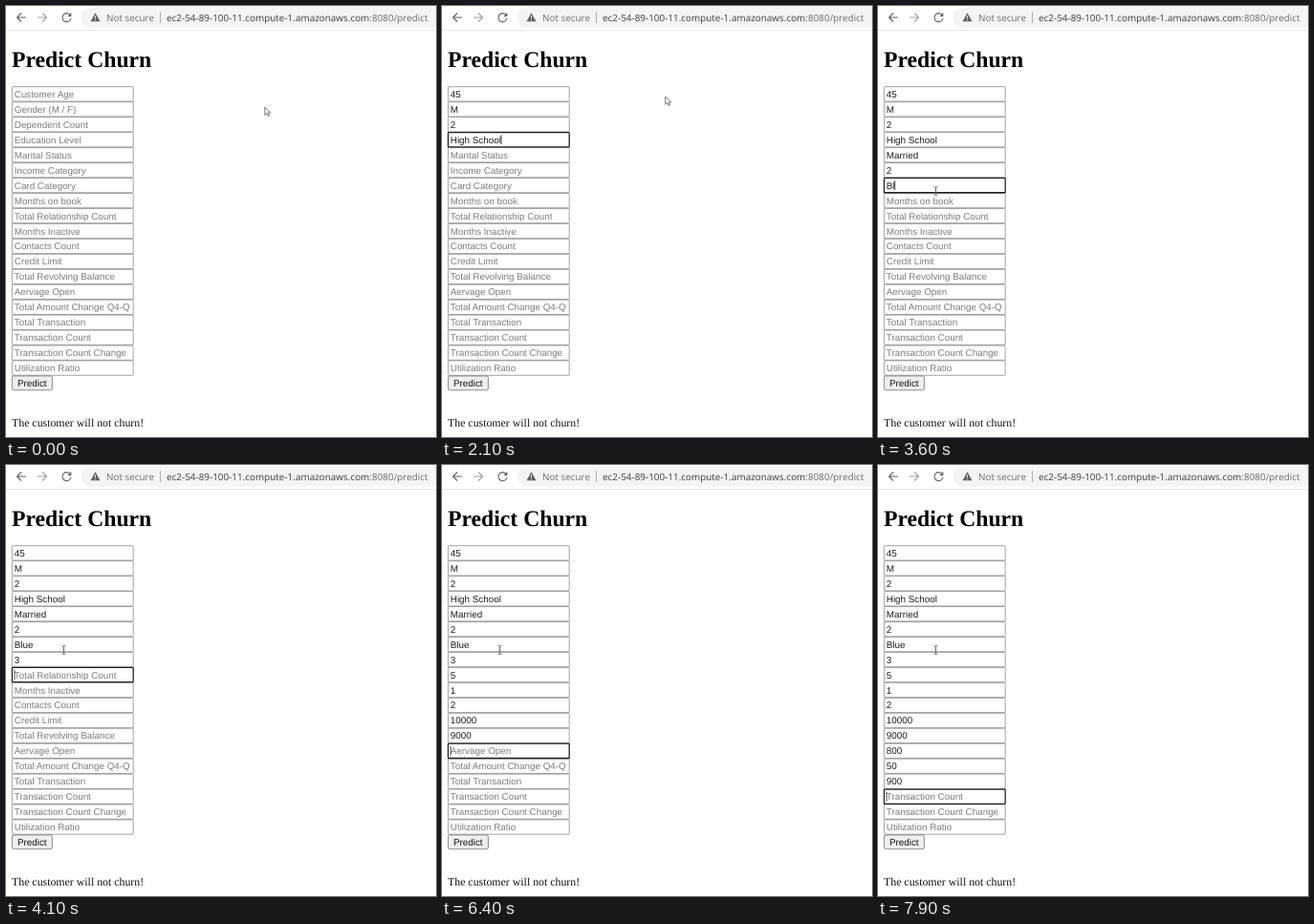
These frames come from a looping animation (450 px wide and 452 px high, 8 s). An HTML page:

```html
<!DOCTYPE html>
<html lang="en">
<head>
<meta charset="utf-8">
<title>Predict Churn</title>
<style>
html, body { margin: 0; width: 100%; height: 100%; overflow: hidden; background: #fff; }
svg { display: block; width: 100vw; height: 100vh; text-rendering: geometricPrecision; }
.bar { font: 9.92px "Open Sans", "Noto Sans", sans-serif; fill: #6b6f74; }
.form { font: 9.85px "Liberation Sans", Arial, sans-serif; }
.page { font: 11.85px "Liberation Serif", "Times New Roman", serif; fill: #111; }
.title { font-size: 23.7px; font-weight: bold; fill: #000; }
.icon { fill: none; stroke: #5f6368; stroke-width: 1.1; }
.box { fill: #fff; stroke: #8c8c8c; stroke-width: .8; }
.box.on { stroke: #222; stroke-width: 1.3; }
</style>
</head>
<body>
<svg id="stage" viewBox="0 0 450 452">
  <rect width="450" height="452" fill="#fff"/>
  <path class="icon" d="M21 12H12M16 7.5L11.5 12L16 16.5"/>
  <path class="icon" d="M33 12H42M38 7.5L42.5 12L38 16.5" opacity=".6"/>
  <path class="icon" d="M67 9.2A4.5 4.5 0 1 0 68 13"/>
  <path d="M68.3 7V11H64.3Z" fill="#5f6368"/>
  <path d="M460 1.5H89A10.5 10.5 0 0 0 89 22.5H460Z" fill="#f3f4f5"/>
  <path d="M93.5 7.3L98.5 16.3H88.5Z" fill="#5f6368"/>
  <path d="M93.5 10.3V13M93.5 14V15.1" stroke="#f3f4f5"/>
  <path d="M161.5 6V18" stroke="#a5a8ab" stroke-width=".9"/>
  <path d="M0 25.5H450" stroke="#e8e9ea"/>
  <g class="bar">
    <text x="105" y="15.5">Not secure</text>
    <text x="168" y="15.5"><tspan fill="#3c3e41">ec2-54-89-100-11.compute-1.amazonaws.com</tspan>:8080/predict</text>
  </g>
  <g class="page">
    <text class="title" x="6" y="64">Predict Churn</text>
    <text x="6" y="441">The customer will not churn!</text>
  </g>
  <g class="form">
    <g id="fields"></g>
    <rect x="6.4" y="388" width="42" height="14.8" rx="1.8" fill="#efefef" stroke="#808080" stroke-width=".9"/>
    <text x="27.3" y="399" text-anchor="middle" fill="#111">Predict</text>
  </g>
  <rect id="caret" y="0" width=".8" height="10" fill="#222"/>
  <path id="arrow" d="M0 0V8.3L2 6.5L3.4 9.5L4.7 8.9L3.4 6H6Z" fill="#fff" stroke="#555" stroke-width=".8"/>
  <path id="beam" d="M-2 -4.3H-.6L0 -3.8L.6 -4.3H2M0 -3.8V3.8M-2 4.3H-.6L0 3.8L.6 4.3H2" fill="none" stroke="#555" stroke-width=".9"/>
</svg>
<script>
const LOOP = 8000, STEP = 100, TOP = 84.7, PITCH = 15.96;
const $ = id => document.getElementById(id);
const labels = ["Customer Age", "Gender (M / F)", "Dependent Count", "Education Level",
  "Marital Status", "Income Category", "Card Category", "Months on book",
  "Total Relationship Count", "Months Inactive", "Contacts Count", "Credit Limit",
  "Total Revolving Balance", "Aervage Open", "Total Amount Change Q4-Q",
  "Total Transaction", "Transaction Count", "Transaction Count Change", "Utilization Ratio"];

// row, text, focus time, first key, last key
const entries = [
  [0, "45", 400, 600, 700], [1, "M", 900, 1100, 1100], [2, "2", 1200, 1500, 1500],
  [3, "High School", 1600, 1700, 2100], [4, "Married", 2200, 2300, 2500],
  [5, "Blue", 2600, 2700, 2800], [6, "", 2900, 2900, 2900],
  [5, "2", 3200, 3300, 3300], [6, "Blue", 3400, 3500, 3700], [7, "3", 3800, 3900, 3900],
  [8, "5", 4000, 4300, 4300], [9, "1", 4500, 4600, 4600], [10, "2", 4800, 5000, 5000],
  [11, "10000", 5300, 5400, 5700], [12, "9000", 5800, 5900, 6200],
  [13, "800", 6300, 6600, 6800], [14, "50", 6900, 7000, 7100],
  [15, "900", 7200, 7400, 7600], [16, "", 7800, 7800, 7800]
];

// time, x, y of the pointer
const path = [[0, 270.8, 106], [100, 270.8, 106], [400, 60, 94], [600, 60, 94], [900, 233.8, 95],
  [2800, 233.8, 95], [3000, 48, 185], [3100, 48, 174], [3200, 48, 174], [3400, 60.5, 194], [LOOP, 60.5, 194]];

function add(parent, tag, attrs) {
  const el = document.createElementNS("http://www.w3.org/2000/svg", tag);
  for (const k in attrs) el.setAttribute(k, attrs[k]);
  return parent.appendChild(el);
}

const fields = labels.map((label, i) => {
  const g = add($("fields"), "g", { transform: `translate(6.4 ${TOP + i * PITCH})` });
  return {
    label,
    box: add(g, "rect", { class: "box", width: 126.8, height: 15.3, rx: .6 }),
    mark: add(g, "rect", { x: 2.4, y: 2, width: 0, height: 11.5, fill: "#3390ff" }),
    text: add(g, "text", { x: 2.4, y: 11.2 })
  };
});

function typed([, text, , first, last], t) {
  if (t < first) return "";
  const part = last > first ? Math.min(1, (t - first) / (last - first)) : 1;
  return text.slice(0, 1 + Math.floor(part * (text.length - 1)));
}

function pointer(t) {
  const i = path.findIndex(p => p[0] > t), [t0, x0, y0] = path[i - 1], [t1, x1, y1] = path[i];
  const k = (t - t0) / (t1 - t0);
  return [x0 + (x1 - x0) * k, y0 + (y1 - y0) * k];
}

function draw(t) {
  const values = labels.map(() => "");
  let current = null, selected = false;
  for (const e of entries) {
    if (t < e[2]) break;
    current = e;
    selected = t < e[3] && values[e[0]] !== "";
    if (!selected) values[e[0]] = typed(e, t);
  }
  fields.forEach(({ label, box, mark, text }, i) => {
    const on = current && current[0] === i, lit = on && selected;
    text.textContent = values[i] || label;
    text.setAttribute("fill", lit ? "#fff" : values[i] ? "#1c1c1c" : "#7c7c7c");
    box.setAttribute("class", on ? "box on" : "box");
    mark.setAttribute("width", lit ? text.getComputedTextLength() : 0);
  });
  // keep the focus ring above the neighbouring borders
  if (current) $("fields").append(fields[current[0]].box.parentNode);

  const caret = $("caret");
  let shown = false;
  if (current) {
    const [row, , focus, first, last] = current;
    const since = t - (t < first ? focus : Math.min(t, last));
    shown = !selected && since % 1000 < 500;
    const width = values[row] ? fields[row].text.getComputedTextLength() : 0;
    caret.setAttribute("x", 8.6 + width);
    caret.setAttribute("y", TOP + row * PITCH + 2.6);
  }
  caret.style.display = shown ? "" : "none";

  const [x, y] = pointer(t), inField = x < 133 && y > 85 && y < 388;
  for (const id of ["arrow", "beam"]) {
    $(id).setAttribute("transform", `translate(${x} ${y})`);
    $(id).style.display = (id === "beam") === inField ? "" : "none";
  }
}

function tick() {
  draw(Math.floor(performance.now() % LOOP / STEP) * STEP);
  requestAnimationFrame(tick);
}
tick();
</script>
</body>
</html>
```
